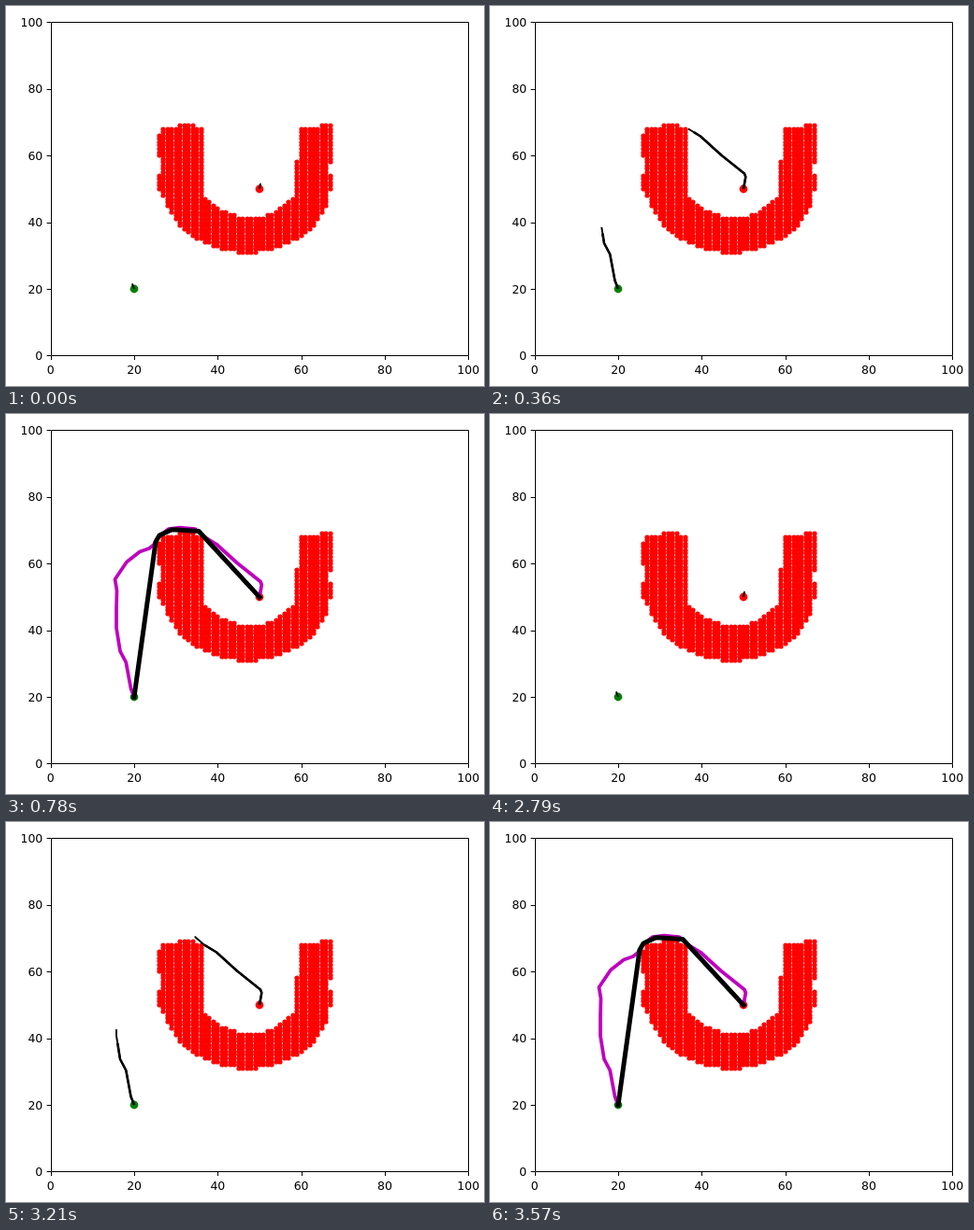
Recreate the animation shown at these times as an HTML page. Size 511 px wide and 407 px high, loop 4910 ms.

```html
<!DOCTYPE html>
<html lang="en">
<head>
<meta charset="utf-8">
<title>Two trees planning a path</title>
<style>
  html, body { margin: 0; width: 100%; height: 100%; overflow: hidden; background: #fff; }
  svg { display: block; }
  text { font: 12.5px "DejaVu Sans", sans-serif; }
  polyline { fill: none; stroke: #000; stroke-linejoin: round; }
</style>
</head>
<body>
<svg id="stage" width="511" height="407" viewBox="0 0 511 407"></svg>
<script>
const LOOP = 4910, SECOND_RUN = 2790, STEP = 60, LAST = 13;
const stage = document.getElementById('stage');

function add(tag, attrs, text) {
  const el = document.createElementNS('http://www.w3.org/2000/svg', tag);
  for (const name in attrs) el.setAttribute(name, attrs[name]);
  if (text !== undefined) el.textContent = text;
  return stage.appendChild(el);
}
const px = v => 47.8 + 4.464 * v;
const py = v => 374.4 - 3.57 * v;
const crisp = v => Math.round(v) + 0.5;
const between = (v, low, high) => v >= low && v <= high;
const inDisc = (x, y, cx, cy, radius) => Math.hypot(x - cx, y - cy) <= radius;

// A U shape: two slightly uneven arms standing on half a ring.
function isObstacle(x, y) {
  if (y < 48) return inDisc(x, y, 47, 51, 20.1) && !inDisc(x, y, 47.7, 53, 11.49);
  if (y === 69) return between(x, 31, 34) || between(x, 65, 67);
  const bulge = between(y, 50, 54);
  const left = bulge || between(y, 60, 66) ? 26 : 27;
  const right = bulge || y >= 58 ? 67 : 66;
  return between(x, left, 36) || between(x, y > 58 ? 60 : 59, right);
}

function dot(x, y, r, fill) {
  add('circle', { cx: Math.round(px(x)), cy: Math.round(py(y)), r, fill });
}

function drawObstacle() {
  for (let y = 31; y <= 69; y++)
    for (let x = 26; x <= 67; x++)
      if (isObstacle(x, y)) dot(x, y, 2.6, '#f00');
}

function drawAxes() {
  const line = d => add('path', { d, stroke: '#000', fill: 'none' });
  line(`M${crisp(px(0))} ${crisp(py(100))}H${crisp(px(100))}V${crisp(py(0))}H${crisp(px(0))}Z`);
  for (let v = 0; v <= 100; v += 20) {
    line(`M${crisp(px(v))} 375v4M48 ${crisp(py(v))}h-4.4`);
    add('text', { x: px(v), y: 394, 'text-anchor': 'middle' }, v);
    add('text', { x: 39.3, y: Math.round(py(v) + 4.6), 'text-anchor': 'end' }, v);
  }
}

const startBranch = [[137, 303], [133.5, 294], [128.3, 266], [122, 254], [118, 229], [118, 210],
  [118.5, 189], [116.5, 177], [129, 158.5], [143, 147.5], [153, 144]];
const goalBranch = [[271, 196], [273.3, 183], [272, 179.5], [247, 159.5], [225, 139.5], [211.5, 131.3],
  [202, 123], [186, 121.5], [174, 123], [163.5, 131], [158, 140], [153, 144]];
const shortcut = [[137, 303], [160, 137], [164, 130], [177.5, 123.7], [206, 125.5], [271, 196]];

// Grown length in pixels: [step, length] keys, linear between and beyond.
const startKeys = [[0, 6], [5, 62], [6, 69], [10, 129]];
const goalKeys = [[0, 6], [5, 87], [6, 94], [10, 148]];

function lengthAt(keys, step) {
  const next = keys.findIndex(([s]) => s > step);
  const i = next < 0 ? keys.length - 1 : Math.max(1, next);
  const [s0, a] = keys[i - 1], [s1, b] = keys[i];
  return Math.max(0, a + (b - a) * (step - s0) / (s1 - s0));
}

const polyline = (points, width, more) =>
  add('polyline', { points: points.join(' '), 'stroke-width': width, ...more });

drawObstacle();
dot(20, 20, 4.4, '#008000');
dot(50, 50, 4.4, '#f00');

// Older parts are heavier than the newest piece at the tip.
const branches = [[startBranch, startKeys], [goalBranch, goalKeys]].flatMap(([points, keys]) => [
  { el: polyline(points, 1.9), keys, lag: 0 },
  { el: polyline(points, 2.6), keys, lag: 1 }
]);
const solution = [
  polyline([...startBranch, ...goalBranch.slice().reverse()], 3.75, { style: 'stroke:#bf00bf', 'stroke-linecap': 'square' }),
  polyline(shortcut, 5, { 'stroke-linecap': 'square' })
];
drawAxes();

let shown = -1;
function render(time) {
  const t = time % LOOP;
  const step = Math.min(LAST, Math.floor((t < SECOND_RUN ? t : t - SECOND_RUN) / STEP));
  if (step === shown) return;
  shown = step;
  const done = step === LAST;
  for (const { el, keys, lag } of branches) {
    el.style.display = done || step < lag ? 'none' : '';
    el.setAttribute('stroke-dasharray', `${lengthAt(keys, step - lag)} 999`);
  }
  for (const el of solution) el.style.display = done ? '' : 'none';
}

render(0);
const began = performance.now();
(function tick() {
  render(performance.now() - began);
  requestAnimationFrame(tick);
})();
</script>
</body>
</html>
```
